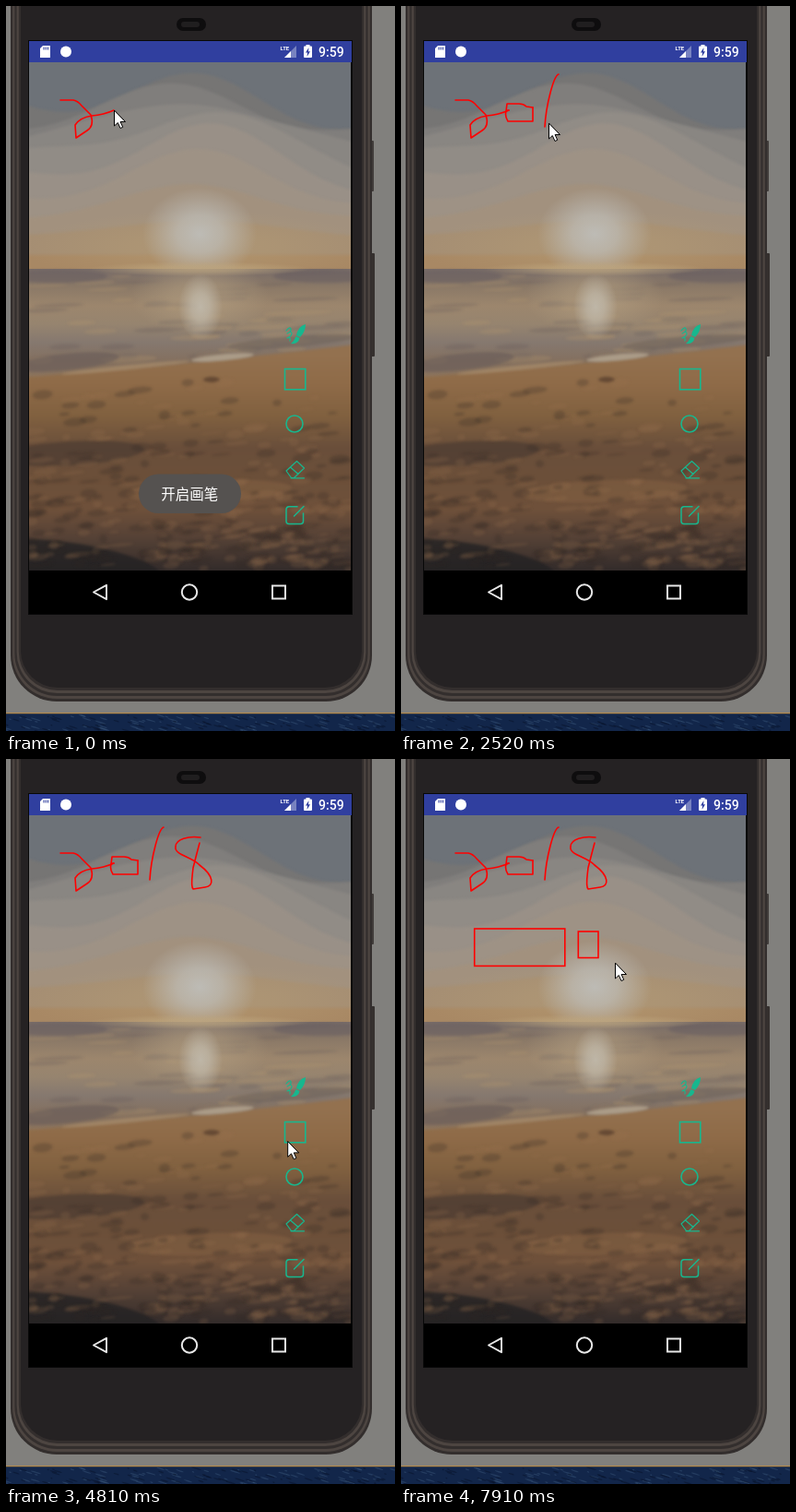
These frames come from a looping animation (422 px wide and 786 px high, 8 s). An HTML page with a canvas:

```html
<!DOCTYPE html>
<html lang="zh">
<head>
<meta charset="utf-8">
<style>
html, body { margin: 0; width: 100%; height: 100%; overflow: hidden; background: #81807d; }
canvas { display: block; width: 422px; height: 786px; }
</style>
</head>
<body>
<canvas id="stage"></canvas>
<script>
const W = 422, H = 786, LOOP = 8000, BEAT = 140;
const GREEN = '#17b78e', RED = '#f00', BLUE = '#303f9f';
const dpr = window.devicePixelRatio || 1;
const stage = document.getElementById('stage');
const backdrop = document.createElement('canvas');
for (const c of [stage, backdrop]) { c.width = W * dpr; c.height = H * dpr; }
let g;

let seed = 7;
const rnd = () => (seed = (seed * 16807) % 2147483647) / 2147483647;
const between = (a, b) => a + (b - a) * rnd();
const clamp = v => Math.max(0, Math.min(1, v));

function box(x, y, w, h, color, r = 0) {
  g.fillStyle = color;
  g.beginPath();
  g.roundRect(x, y, w, h, r);
  g.fill();
}

function blob(x, y, rx, ry, color, angle = 0) {
  g.fillStyle = color;
  g.beginPath();
  g.ellipse(x, y, rx, ry, angle, 0, 7);
  g.fill();
}

function fill(d, color) {
  g.fillStyle = color;
  g.fill(new Path2D(d));
}

function line(d, color, width) {
  g.strokeStyle = color;
  g.lineWidth = width;
  g.lineJoin = g.lineCap = 'round';
  g.stroke(new Path2D(d));
}

function outline(x, y, w, h, color, width) {
  g.strokeStyle = color;
  g.lineWidth = width;
  g.lineJoin = 'miter';
  g.strokeRect(x, y, w, h);
}

function ring(x, y, r, color, width) {
  g.strokeStyle = color;
  g.lineWidth = width;
  g.beginPath();
  g.arc(x, y, r, 0, 7);
  g.stroke();
}

function label(text, x, y, font, align = 'left') {
  g.fillStyle = '#fff';
  g.textAlign = align;
  g.font = font;
  g.fillText(text, x, y);
}

function ramp(y0, y1, ...colors) {
  const grad = g.createLinearGradient(0, y0, 0, y1);
  colors.forEach((c, i) => grad.addColorStop(i / (colors.length - 1), c));
  return grad;
}

// Soft ellipse of one colour, fading to clear.
function glow(x, y, rx, ry, rgb, alpha) {
  g.save();
  g.translate(x, y);
  g.scale(rx, ry);
  const grad = g.createRadialGradient(0, 0, 0, 0, 0, 1);
  grad.addColorStop(0, `rgba(${rgb},${alpha})`);
  grad.addColorStop(0.4, `rgba(${rgb},${alpha * 0.75})`);
  grad.addColorStop(1, `rgba(${rgb},0)`);
  g.fillStyle = grad;
  g.fillRect(-1, -1, 2, 2);
  g.restore();
}

// Fills from the curve y = f(x) down to the floor.
function under(f, floor, color) {
  g.fillStyle = color;
  g.beginPath();
  g.moveTo(5, floor);
  for (let x = 5; x <= 395; x += 6) g.lineTo(x, f(x));
  g.lineTo(395, floor);
  g.fill();
}

function drawSky() {
  box(25, 61, 350, 226, '#6d7278');
  g.filter = 'blur(1.5px)';
  const layers = 9;
  for (let i = 0; i < layers; i++) {
    const p = i / (layers - 1), lift = 62 * Math.sin(Math.PI * (0.15 + p * 0.85));
    const edge = x => 100 + 170 * p - lift * Math.exp(-(((x - 215) / 105) ** 2))
      + (1 - p) * (14 * Math.sin(x / 43 + i * 1.3) + x / 14);
    under(edge, 300, `hsl(32,${1 + 27 * p * p}%,${46 + 11 * Math.sin(p * 2.5)}%)`);
  }
  g.filter = 'none';
  glow(210, 262, 190, 40, '185,160,118', 0.45);
  glow(210, 247, 62, 50, '189,187,181', 1);
}

function drawSea() {
  box(25, 285, 350, 130, ramp(285, 405, '#786c68', '#8b7967', '#9c866d', '#96846f', '#85786f', '#84705f', '#8e755d'));
  g.filter = 'blur(1.5px)';
  for (let i = 0; i < 50; i++) {
    const y = between(288, 385);
    blob(between(25, 375), y, between(10, 38), 1 + (y - 280) / 40,
      i % 2 ? 'rgba(100,92,92,.28)' : 'rgba(180,150,112,.28)', -0.04);
  }
  for (const x of [55, 345]) blob(x, 293, 55, 7, 'rgba(105,96,98,.6)');
  blob(65, 386, 58, 9, 'rgba(108,95,90,.7)', -0.1);
  blob(310, 364, 70, 6, 'rgba(111,99,91,.6)', -0.08);
  g.filter = 'none';
  glow(210, 285, 120, 8, '190,166,126', 0.8);
  glow(210, 315, 75, 42, '182,162,132', 0.6);
  glow(211, 326, 24, 36, '193,186,172', 0.9);
}

function drawSand() {
  g.filter = 'blur(1.5px)';
  under(x => 404 - x / 14 - (x / 120) ** 2, 640,
    ramp(378, 612, '#93714f', '#8e6a47', '#80603f', '#694e3a', '#6b4f39', '#6e503a', '#534035', '#322b2a'));
  blob(235, 381, 34, 3.5, '#ab9c88', -0.09);
  blob(130, 392, 70, 2.5, 'rgba(170,142,107,.7)', -0.1);
  blob(223, 405, 9, 3, 'rgba(83,59,43,.7)');
  blob(70, 485, 80, 13, 'rgba(64,52,46,.5)', -0.06);
  blob(220, 526, 90, 12, 'rgba(140,103,70,.4)', -0.04);
  blob(70, 604, 100, 22, 'rgba(35,34,36,.8)', 0.15);
  for (let i = 0; i < 360; i++) {
    const y = 405 + Math.sqrt(rnd()) * 205;
    blob(between(25, 375), y, between(4, 14), between(1, 5),
      i % 2 ? 'rgba(45,37,35,.24)' : 'rgba(155,114,79,.2)', -0.1);
  }
  g.filter = 'none';
}

function drawPhone() {
  box(0, 0, W, H, '#81807d');
  box(395, 146, 4, 55, '#413c3a', 1);
  box(396, 268, 4, 112, '#35302e', 1);
  // nested rims, alternating light and dark
  for (let i = 0; i < 5; i++)
    box(5 + i * 2.2, -60, 392 - i * 4.4, 814 - i * 3, i % 2 ? '#4d4541' : '#332e2d', 50 - i * 2);
  box(16, -60, 370, 799, '#252223', 40);
  box(185, 13, 32, 14, '#0e0d0e', 7);
  box(190, 17, 20, 6, '#201e1f', 3);
  box(24, 37, 352, 623, '#080808');

  box(0, 766, W, 20, '#12264a');
  for (let i = 0; i < 160; i++)
    blob(between(0, W), between(769, 786), between(1, 6), 0.7,
      i % 2 ? 'rgba(8,18,40,.5)' : 'rgba(66,94,130,.4)', 0.3);
  box(0, 766, W, 1.3, '#b58a4b');
}

function drawStatus() {
  box(25, 38, 350, 23, BLUE);
  fill('M40 43H48V56H37V46Z', '#fff');
  for (let i = 0; i < 3; i++) box(40.5 + i * 2.2, 44.5, 1.1, 3, BLUE);
  blob(65, 49.5, 6, 6, '#fff');
  label('LTE', 297.5, 47.5, '700 6px Roboto, sans-serif');
  fill('M315 43V56H302Z', '#7883c0');
  fill('M309 49V56H302Z', '#fff');
  box(325.5, 42, 4, 3, '#fff');
  box(323, 43.5, 9, 12.5, '#fff', 1);
  fill('M328.5 45L325 50.5H327L326.5 55 330 49.3H328Z', BLUE);
  label('9:59', 339, 54.5, '500 14px Roboto, sans-serif');
}

function drawNav() {
  box(25, 612, 350, 47, '#000');
  line('M95 635.5L109 627.8V643.2Z', '#e8e8e8', 1.9);
  ring(199, 635.5, 8.2, '#e8e8e8', 2);
  outline(289, 628.5, 14, 14, '#e8e8e8', 2);
}

function drawTools() {
  fill('M325 345Q317 347 315 357L319 359Q325 353 325 345M314.5 358L318.5 360Q317 367 309 366 312 364 314.5 358', GREEN);
  line('M304 352Q308 347 309 350T305 355Q310 352 310 355T305 360Q309 358 308 363', GREEN, 1.2);
  outline(302.5, 393.5, 22.3, 22.3, GREEN, 1.6);
  ring(313, 453, 9, GREEN, 1.6);
  line('M304 504L315.5 493.5 323.5 501 312.5 511.5H309.5ZM308.5 500L317 507.5M309 511.8H323.5', GREEN, 1.2);
  line('M316 542.7H307Q304 542.7 304 546V558.5Q304 561.5 307 561.5H319.5Q322.5 561.5 322.5 558.5V550M312.5 553L323 542.5', GREEN, 1.5);
}

function drawBackdrop() {
  g = backdrop.getContext('2d');
  g.scale(dpr, dpr);
  drawPhone();
  g.save();
  g.beginPath();
  g.rect(25, 38, 349, 621);
  g.clip();
  drawSky();
  drawSea();
  drawSand();
  g.restore();
  drawStatus();
  drawNav();
  drawTools();
}

// Pointer moves, timed in beats: hovering eases out, ink and rect draw as they go.
const two = 'M59 102H73Q78 103 82 108L92 118Q96 130 88 135L76 143 75 129Q80 121 93 119 106 118 117 113';
const moves = [
  move('ink', 0, 5, 'M117 113C112 113 113 120 116 125H143V110'),
  move('ink', 5, 7, 'M143 110L136 109Q133 106 128 106H115L114 114'),
  move('hover', 7, 9, 'M114 114Q165 85 171 74'),
  move('ink', 13, 18, 'M171 74Q167 75 162 94T156 131'),
  move('hover', 18, 20, 'M160 127L211 85'),
  move('ink', 20, 27, 'M211 85C198 83 184 87 184 95 182 104 202 106 210 115 226 127 226 138 216 139L203 141C200 138 202 128 203 118Q206 106 210 91'),
  move('hover', 28, 35, 'M209 90L290 300Q360 470 325 483T307 404'),
  move('hover', 36, 42, 'M307 404L100 214 80 184'),
  move('rect', 42, 47, 'M79.7 184L177.8 224.4'),
  move('hover', 47, 49, 'M178 224L222 174'),
  move('hover', 49, 52, 'M222 174Q270 160 192 187'),
  move('rect', 52, 55, 'M192.3 187L214 215.5'),
  move('hover', 55, 56, 'M214 216L232 221')
];

function move(kind, from, to, d) {
  const holder = document.createElement('div');
  holder.innerHTML = `<svg><path d="${d}"/></svg>`;
  const path = holder.querySelector('path'), length = path.getTotalLength();
  const progress = beat => {
    const k = clamp((beat - from) / (to - from));
    return kind === 'hover' ? 1 - (1 - k) ** 2 : k;
  };
  const at = beat => path.getPointAtLength(length * progress(beat));
  return { kind, from, d, length, progress, at };
}

function drawMark(m, beat) {
  if (m.kind === 'ink') {
    g.setLineDash([m.length * m.progress(beat), 999]);
    line(m.d, RED, 1.6);
    g.setLineDash([]);
  } else if (m.kind === 'rect') {
    const a = m.at(m.from), b = m.at(beat);
    outline(a.x, a.y, b.x - a.x, b.y - a.y, RED, 1.6);
  }
}

function toast(text, alpha) {
  g.globalAlpha = clamp(alpha);
  box(144, 507.5, 111, 42.5, '#555250', 21.2);
  label(text, 199.3, 534.5, '15.5px "Noto Sans CJK SC", "Noto Sans CJK", sans-serif', 'center');
  g.globalAlpha = 1;
}

function drawCursor({ x, y }) {
  g.save();
  g.translate(x + 0.5, y + 0.5);
  const arrow = new Path2D('M0 0V16.5L3.8 13 6.5 19 9.2 17.8 6.6 12H11.6Z');
  g.fillStyle = '#fff';
  g.fill(arrow);
  g.lineJoin = 'miter';
  g.strokeStyle = '#000';
  g.lineWidth = 1;
  g.stroke(arrow);
  g.restore();
}

function draw(t) {
  const beat = Math.floor((t + 40) / BEAT);
  const begun = moves.filter(m => m.from <= beat);
  g.setTransform(1, 0, 0, 1, 0, 0);
  g.drawImage(backdrop, 0, 0);
  g.scale(dpr, dpr);
  line(two, RED, 1.6);
  for (const m of begun) if (beat > m.from) drawMark(m, beat);
  toast('开启画笔', 1 - beat / 4);
  toast('绘制矩形', Math.min((beat - 35) / 2, (54 - beat) / 4));
  drawCursor(begun[begun.length - 1].at(beat));
}

drawBackdrop();
g = stage.getContext('2d');
const begin = performance.now();
function tick() {
  draw((performance.now() - begin) % LOOP);
  requestAnimationFrame(tick);
}
tick();
</script>
</body>
</html>
```
